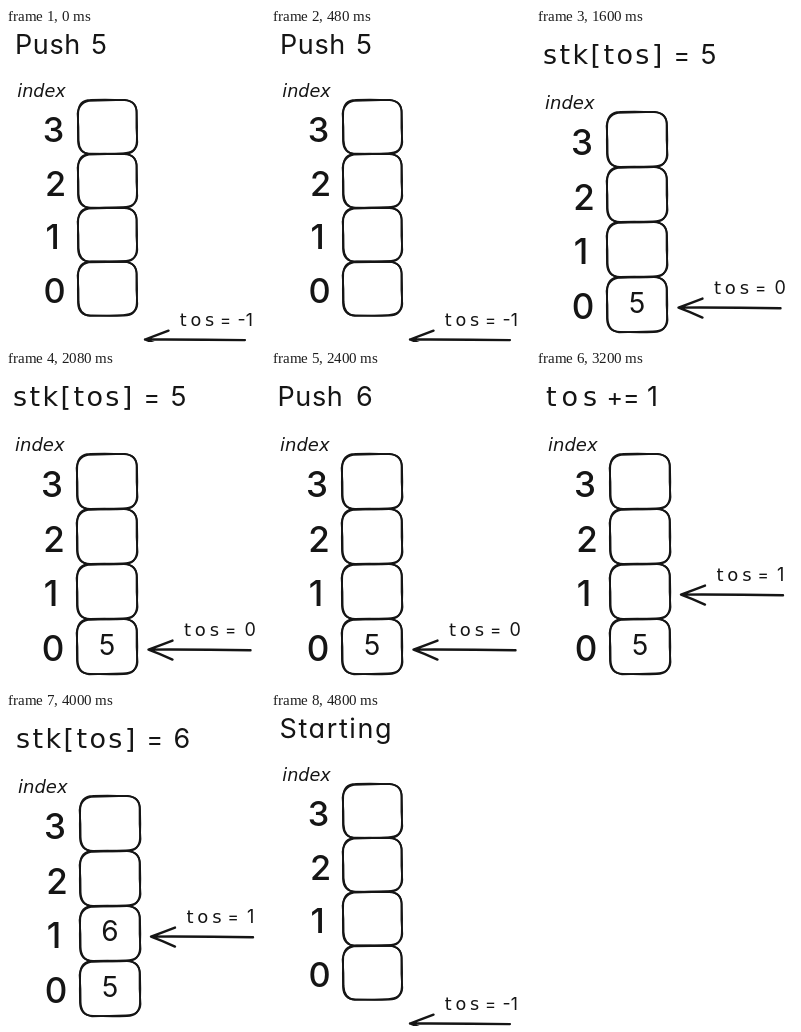
Recreate the animation shown at these times as an HTML page. Size 259 px wide and 314 px high, loop 5600 ms.

```html
<!DOCTYPE html>
<html lang="en">
<head>
<meta charset="utf-8">
<title>Stack push</title>
<style>
  html, body { margin: 0; width: 100%; height: 100%; overflow: hidden; background: #fff; }
  svg { display: block; width: 100vw; height: 100vh; }
  text {
    font: 400 27px Inter, "Open Sans", sans-serif;
    font-feature-settings: "cv11";
    fill: #151515;
  }
  .sign { font-size: 25px; }
  .wide, .code, .small .name, .index { font-family: "DejaVu Sans", sans-serif; }
  .wide { letter-spacing: 5px; }
  .code { letter-spacing: 2.4px; }
  .open { letter-spacing: 1.6px; }
  .push { letter-spacing: .6px; }
  .small text { font-size: 18px; }
  .small .name { letter-spacing: 3.8px; }
  .small .sign { font-size: 17px; }
  .index { font-size: 18px; font-style: italic; }
  .digits text { font-size: 35px; font-weight: 500; text-anchor: middle; }
  .value { font-size: 28px; text-anchor: middle; }
  path { fill: none; stroke: #151515; stroke-width: 1.8; stroke-linecap: round; stroke-linejoin: round; }
  .scene {
    visibility: hidden;
    animation: show 5600ms step-end infinite;
    animation-delay: calc(var(--i) * 800ms);
  }
  @keyframes show {
    0% { visibility: visible; }
    14.285714%, 100% { visibility: hidden; }
  }
</style>
</head>
<body>
<svg viewBox="0 0 259 314" preserveAspectRatio="none">
  <defs>
    <g id="cell">
      <path d="M13 0Q30 -.6 47 .2Q59.6 .4 60 13Q60.6 28 60 42Q59.4 55 47 55Q30 55.6 13 54.8Q.4 54.6 0 42Q-.4 28 .2 13Q.4 .4 13 0"/>
      <path stroke-width="1.1" d="M11 .8Q30 .4 48 -.2Q60.6 1.6 59.6 14Q59.2 28 60.5 43Q60 54 46 54.4Q30 55 12 55.3Q1 54 .6 41Q.8 28 -.4 14Q1 1.4 14 .3"/>
    </g>
    <g id="stack">
      <use href="#cell"/>
      <use href="#cell" y="55"/>
      <use href="#cell" y="110"/>
      <use href="#cell" y="165"/>
      <text class="index" x="-62" y="-3">index</text>
      <g class="digits">
        <text x="-25" y="43">3</text>
        <text x="-23" y="98">2</text>
        <text x="-26" y="152">1</text>
        <text x="-24" y="207">0</text>
      </g>
    </g>
    <g id="pointer">
      <path style="stroke-width:2.4" d="M102 .6Q52 -.2 0 0M24 -9Q11 -4 0 0Q11 4 24 10"/>
      <g class="small">
        <text class="name" x="35.5" y="-14">tos</text>
        <text class="sign" x="76.5" y="-14">=</text>
      </g>
    </g>
    <g id="empty">
      <use href="#stack" transform="translate(72 72) scale(.98)"/>
      <g class="small" transform="translate(139 311.5) scale(.98)">
        <use href="#pointer"/>
        <text x="94.5" y="-14">-1</text>
      </g>
    </g>
    <g id="first">
      <use href="#stack" x="71" y="84"/>
      <g class="small" transform="translate(142.5 279.6)">
        <use href="#pointer"/>
        <text x="96" y="-14">0</text>
      </g>
    </g>
    <g id="second">
      <use href="#stack" x="74" y="84"/>
      <g class="small" transform="translate(145 224.6)">
        <use href="#pointer"/>
        <text x="96" y="-14">1</text>
      </g>
      <text class="value" x="104" y="285">5</text>
    </g>
  </defs>

  <g class="scene" style="--i:0">
    <text class="push" x="9" y="25.5">Push <tspan x="85">5</tspan></text>
    <use href="#empty"/>
  </g>
  <g class="scene" style="--i:1">
    <text y="36"><tspan class="wide" x="7.5">tos</tspan> <tspan class="sign" x="68">+=</tspan> <tspan x="108">1</tspan></text>
    <use href="#first"/>
  </g>
  <g class="scene" style="--i:2">
    <text y="36"><tspan class="code" x="7">stk[tos]</tspan> <tspan class="sign" x="137.5">=</tspan> <tspan x="164.5">5</tspan></text>
    <use href="#first"/>
    <text class="value" x="101" y="285">5</text>
  </g>
  <g class="scene" style="--i:3">
    <text class="push" x="6.5" y="36">Push <tspan x="85">6</tspan></text>
    <use href="#first"/>
    <text class="value" x="101" y="285">5</text>
  </g>
  <g class="scene" style="--i:4">
    <text y="36"><tspan class="wide" x="10">tos</tspan> <tspan class="sign" x="70.5">+=</tspan> <tspan x="111">1</tspan></text>
    <use href="#second"/>
  </g>
  <g class="scene" style="--i:5">
    <text y="36"><tspan class="code" x="10">stk[tos]</tspan> <tspan class="sign" x="140.5">=</tspan> <tspan x="167.5">6</tspan></text>
    <use href="#second"/>
    <text class="value" x="104" y="229">6</text>
  </g>
  <g class="scene" style="--i:6">
    <text class="open" x="8.5" y="25.5">Starting</text>
    <use href="#empty"/>
  </g>
</svg>
</body>
</html>
```
